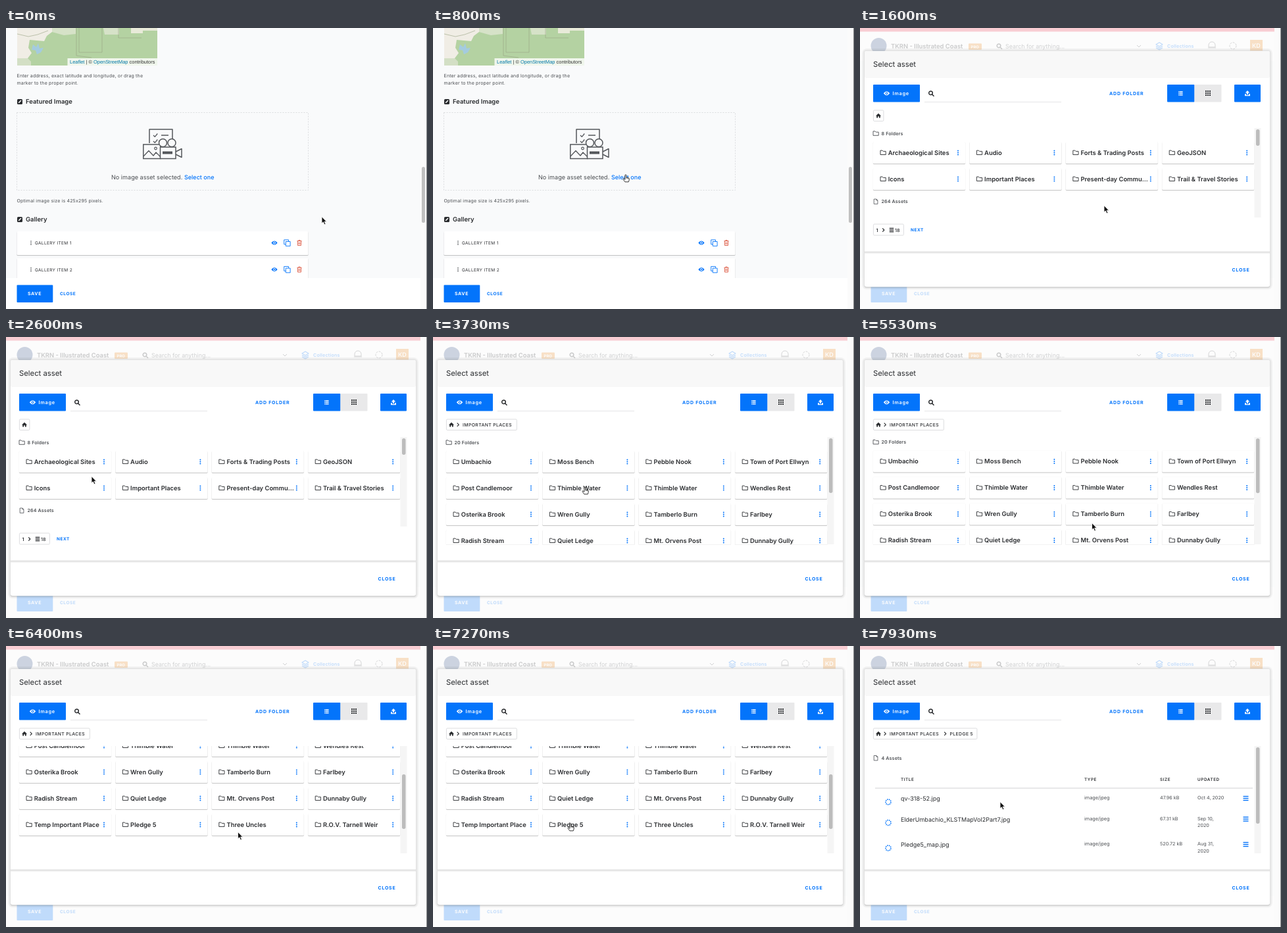
Recreate the animation shown at these times as an HTML page. Size 640x427 px, loop 8000 ms.

```html
<!DOCTYPE html>
<html lang="en">
<head>
<meta charset="utf-8">
<title>Select asset</title>
<style>
html, body { margin: 0; width: 100%; height: 100%; overflow: hidden; background: #f9fafb; }
svg { display: block; width: 100vw; height: 100vh; }
text { font-family: Inter, sans-serif; white-space: pre; text-rendering: geometricPrecision; }
</style>
</head>
<body>
<svg id="stage" viewBox="0 0 640 427" xmlns="http://www.w3.org/2000/svg"></svg>
<script>
const LOOP = 8000, BLUE = '#0374fb', INK = '#2b2d30', GREY = '#4c4f53';

const text = (x, y, s, size, fill = INK, weight = 400, gap = 0, more = '') =>
  `<text x="${x}" y="${y}" font-size="${size}" fill="${fill}" font-weight="${weight}" letter-spacing="${gap}" ${more}>${s}</text>`;
const rect = (x, y, w, h, fill, more = '') =>
  `<rect x="${x}" y="${y}" width="${w}" height="${h}" fill="${fill}" ${more}/>`;
const line = (d, stroke, width = 1, more = '') =>
  `<path d="${d}" fill="none" stroke="${stroke}" stroke-width="${width}" stroke-linejoin="round" ${more}/>`;
const shape = (d, fill, more = '') => `<path d="${d}" fill="${fill}" ${more}/>`;
const dot = (x, y, r, fill, more = '') => `<circle cx="${x}" cy="${y}" r="${r}" fill="${fill}" ${more}/>`;
const group = (body, more = '') => `<g ${more}>${body}</g>`;
const at = (x, y, body) => group(body, `transform="translate(${x} ${y})"`);

const card = (x, y, w, h) =>
  rect(x - .5, y, w + 1, h + 1.6, '#000', 'opacity=".05" rx="2"') +
  rect(x, y + 1, w, h, '#000', 'opacity=".17" rx="1.5"') + rect(x, y, w, h, '#fff', 'rx="1.5"');

// Icons, each centred on 0,0
const eye = color => shape('M-4.7 0Q0-6 4.7 0Q0 6-4.7 0Z', color) + dot(0, 0, 1.9, '#fff') + dot(0, 0, 1.1, color);
const dots = (color, r = 1, gap = 3) => [-gap, 0, gap].map(y => dot(0, y, r, color)).join('');
const bars = (color, w = 8, gap = 3) => [-gap, 0, gap].map(y => rect(-w / 2, y - .7, w, 1.4, color)).join('');
const folder = color => line('M-4-3.2H-1L.3-1.9H4.2V3.2H-4Z', color, .9);
const sheet = color => line('M-2.8-3.7H1L2.9-1.8V3.7H-2.8ZM1-3.7V-1.8H2.9', color, .8);
const home = shape('M-4 .2L0-3.5L4 .2H2.8V3.3H.9V.9H-.9V3.3H-2.8V.2Z', INK);
const chevron = color => line('M-1.3-2.6L1.3 0L-1.3 2.6', color, 1.2);
const lens = (color, r = 2.8) => line(`M${-r - 1} -1a${r} ${r} 0 1 0 ${2 * r} 0a${r} ${r} 0 1 0 ${-2 * r} 0M1.2 1.2L4 4`, color, 1.5);
const edit = rect(-4, -4, 8, 8, INK, 'rx="1.6"') + line('M-1.8 1.8L2-2', '#fff', 1.5);
const copy = line('M-2-2H4.8V4.8H-2ZM-2.2 2.2H-4.6V-4.6H2.2V-2.2', BLUE, .9);
const trash = line('M-3.5-2.8H3.5M-1.2-3V-4H1.2V-3M-2.7-2.8L-2.4 4H2.4L2.7-2.8M-.9-1V2.4M.9-1V2.4', '#dd5a43', .9);

function map() {
  return group(
    rect(17, 0, 213, 57, '#b4d2a2') +
    shape('M17 0H70V6L62 12L58 20L36 18L34 30L39 38L33 46H17Z', '#f0ede5') +
    shape('M17 46H33L38 51V57H17Z', '#d3dfc5') +
    shape('M70 0H106V9L88 11L70 6ZM148 0H172V10H150Z', '#d6e2c8') +
    shape('M190 0H230V4H208V8H190Z', '#e8ead9') +
    shape('M41 25L46 29L49 23L51 31L57 30L53 37L47 40L45 34L39 33Z', '#a4cbdf') +
    line('M17 9L34 13L48 10L64 4M107 0V42L130 45M111 0V37H146V0M171 0V15H206', '#98a284', .6) +
    rect(93.5, 46, 136.5, 11, '#fff', 'opacity=".8"') +
    `<text x="97" y="54.4" font-size="7.45" fill="#333" style="font-family:'Liberation Sans',Arial,sans-serif"><tspan fill="#0078a8">Leaflet</tspan> | © <tspan fill="#0078a8">OpenStreetMap</tspan> contributors</text>`);
}

const mediaIcon = group(
  line('M218 175V154H253V168M236 163H247M232 172H237', '#54575b', 1.5) +
  line('M224 163L226.3 165.3L230.3 160.5M224 172L226.3 174.3L230.3 169.5', '#54575b', 1.3) +
  rect(208.8, 177, 26, 21.5, '#f9fafb', 'stroke="#54575b" stroke-width="1.5"') +
  line('M209 195L217 186.5L224 194L228 189L235 196', '#54575b', 1.3) +
  dot(227.5, 183, 1.8, 'none', 'stroke="#54575b" stroke-width="1.2"') +
  [238.5, 252].map(x => dot(x, 174.5, 6, '#f9fafb', 'stroke="#54575b" stroke-width="1.5"')).join('') +
  rect(234.5, 181, 23.5, 17.5, '#f9fafb', 'stroke="#54575b" stroke-width="1.5"') +
  line('M258 188L267 183.5V196.5L258 192', '#54575b', 1.5) + rect(238, 187.5, 15, 4, '#54575b'));

function galleryItem(n, y) {
  return card(16.5, y - 18, 443, 36) + at(38, y - .5, dots(GREY, .8, 2.4)) +
    text(44, y + 2, 'GALLERY ITEM ' + n, 6.5, INK, 400, .34) +
    at(408, y - .5, eye(BLUE)) + at(427.3, y - .5, copy) + at(446, y - .5, trash);
}

function page() {
  return rect(0, 0, 640, 427, '#f9fafb') + map() +
    text(16.5, 75.3, 'Enter address, exact latitude and longitude, or drag the', 7, GREY, 400, .18) +
    text(16.5, 86.2, 'marker to the proper point.', 7, GREY, 400, .18) +
    at(21, 112, edit) + text(30, 115.4, 'Featured Image', 9.45, INK, 600) +
    rect(16.5, 128.5, 443, 118, 'none', 'stroke="#d6d8db" stroke-width=".9" stroke-dasharray="2 2"') +
    mediaIcon +
    text(160, 229.6, 'No image asset selected.', 9.1, GREY) +
    text(271, 229.6, 'Select one', 9, BLUE, 500) +
    text(16.5, 264.7, 'Optimal image size is 425x295 pixels.', 7, GREY, 400, .18) +
    at(21, 291, edit) + text(30, 294.4, 'Gallery', 9.45, INK, 600) +
    galleryItem(1, 327) + galleryItem(2, 367.5) +
    rect(630, 0, 10, 427, '#fbfbfb') + rect(632, 211, 5, 85, '#c1c1c1', 'rx="2.5"') +
    rect(0, 380, 630, 47, '#fff') +
    rect(16.5, 390.5, 54.8, 26.5, BLUE, 'rx="1"') + text(33, 406.4, 'SAVE', 7, '#fff', 700, .6) +
    text(82, 406.3, 'CLOSE', 6.5, BLUE, 700, .55);
}

function topBar() {
  return rect(0, 0, 630, 50, '#fff') + rect(0, 0, 630, 5.5, '#ee3a55') +
    dot(28.5, 27, 12, '#37558a') +
    text(47, 31, 'TKRN - Illustrated Coast', 9.4, INK, 600) +
    rect(165, 23.5, 20, 9.5, '#f08a1c', 'rx="1"') + text(168.5, 30.6, 'PRO', 6, '#fff', 700) +
    at(212, 28, lens(INK)) + text(221, 31, 'Search for anything...', 8.9, GREY) +
    line('M421 26L424 29L427 26', GREY, 1) +
    at(455, 27, line('M-5-2L0-5L5-2L0 1ZM-5 .5L0 3.5L5 .5M-5 3L0 6L5 3', BLUE, 1.2)) +
    text(467, 30, 'Collections', 7.1, BLUE, 600, .2) +
    line('M530 29V26a5 5 0 0 1 10 0V29ZM529 30H541', GREY, .9) +
    dot(567, 27, 5, 'none', `stroke="${GREY}" stroke-width=".9" stroke-dasharray="3 1.5"`) +
    rect(593, 18, 19, 16.5, '#f08a1c') + text(596, 30, 'KD', 9, '#fff', 600);
}

function folders(names) {
  return names.map((name, i) => {
    const x = 20 + i % 4 * 146.4, y = 173 + (i >> 2) * 40;
    return card(x, y, 140, 33) + at(x + 15, y + 16.3, folder(INK)) +
      text(x + 22.7, y + 19.8, name, 9.4, INK, 600) + at(x + 129, y + 16.5, dots(BLUE));
  }).join('');
}
const heading = (icon, y, s) => at(24, y - 2.6, icon(GREY)) + text(32.5, y, s, 7.1, GREY, 600, .15);

function scroller(end, size) {
  return rect(599.5, 152, 10, end - 152, '#f5f5f5') +
    rect(602, 154, 5.5, size, '#bcbcbc', 'class="thumb" rx="2.7"');
}

function crumbs(width, ...names) {
  let x = 38;
  return rect(20.4, 125, width, 16.5, '#fff', 'rx="1.5" stroke="#d9dadc" stroke-width=".9"') + at(28, 133.3, home) +
    names.map(name => {
      const part = at(x, 133.3, chevron(INK)) + text(x + 7, 135.8, name, 6.9, INK, 500, .36);
      x += 91.5;
      return part;
    }).join('');
}

const ROOT = ['Archaeological Sites', 'Audio', 'Forts &amp; Trading Posts', 'GeoJSON',
  'Icons', 'Important Places', 'Present-day Commu...', 'Trail &amp; Travel Stories'];
const PLACES = ['Umbachio', 'Moss Bench', 'Pebble Nook', 'Town of Port Ellwyn',
  'Post Candlemoor', 'Thimble Water', 'Thimble Water', 'Wendles Rest',
  'Osterika Brook', 'Wren Gully', 'Tamberlo Burn', 'Farlbey',
  'Radish Stream', 'Quiet Ledge', 'Mt. Orvens Post', 'Dunnaby Gully',
  'Temp Important Place', 'Pledge 5', 'Three Uncles', 'R.O.V. Tarnell Weir'];
const FILES = [
  [235, 'qv-318-52.jpg', '47.96 kB', 'Oct 4, 2020'],
  [266.5, 'ElderUmbachio_KLSTMapVol2Part7.jpg', '67.31 kB', 'Sep 10,', '2020'],
  [305, 'Pledge5_map.jpg', '520.72 kB', 'Aug 31,', '2020']];

function rootView() {
  return crumbs(15.5) +
    group(heading(folder, 162.7, '8 Folders') + folders(ROOT) + heading(sheet, 266.3, '264 Assets'), 'clip-path="url(#short)"') +
    scroller(288, 25) +
    rect(20.4, 298, 46, 17, '#fff', 'rx="1.5" stroke="#d9dadc" stroke-width=".9"') +
    text(24.5, 309.6, '1', 7.2, INK, 600) + at(35.5, 307, chevron(INK)) + at(48, 307, bars(INK, 6.5, 2.6)) +
    text(53, 309.6, '18', 7.2, INK, 500) + text(77, 309.3, 'NEXT', 6.4, BLUE, 700, .6);
}

function placesView() {
  return crumbs(107, 'IMPORTANT PLACES') +
    group(group(heading(folder, 162.7, '20 Folders') + folders(PLACES), 'id="list"'), 'clip-path="url(#tall)"') +
    scroller(315, 83);
}

function filesView() {
  const heads = [[62, 'TITLE'], [341, 'TYPE'], [456, 'SIZE'], [513, 'UPDATED']];
  const spinner = Array.from({ length: 9 }, (_, i) => {
    const a = i * Math.PI * 2 / 9;
    return dot(4 * Math.cos(a), 4 * Math.sin(a), .9, BLUE);
  }).join('');
  return crumbs(157.5, 'IMPORTANT PLACES', 'PLEDGE 5') + heading(sheet, 172.8, '4 Assets') +
    heads.map(([x, s]) => text(x, 204.8, s, 6.3, INK, 600, .6)).join('') +
    line('M23 216H597', '#cfd0d2', 1) +
    FILES.map(([y, name, size, ...date]) =>
      at(43, y + 2, group(spinner, 'class="spin"')) + text(62, y, name, 9, INK) +
      text(341, y - 2, 'image/jpeg', 7.3, GREY) + text(456, y - 2, size, 7.2, GREY) +
      date.map((s, i) => text(513, y - 2 + i * 10.5, s, 7.2, GREY)).join('') +
      at(586.5, y - 3.5, bars(BLUE))).join('') +
    scroller(315, 116);
}

function modal() {
  const halo = [4, 2.5, 1].map(g => rect(7 - g, 35 - g, 616 + 2 * g, 358.5 + 2 * g, '#000', `rx="${3 + g}" opacity=".035"`)).join('');
  return halo + rect(7, 36, 616, 358.5, '#000', 'rx="3" opacity=".15"') + rect(7, 35, 616, 358.5, '#fff', 'rx="3"') +
    rect(7, 35, 616, 41, '#f8f8f8', 'rx="3"') + text(20, 58.8, 'Select asset', 11.3, INK) +
    rect(7, 339, 616, 4, '#f3f3f3') + rect(7, 340, 616, 1.4, '#dfdfdf') +
    text(565.5, 369.5, 'CLOSE', 7, BLUE, 700, .75) +
    rect(20, 86, 71, 26.5, BLUE, 'rx="1"') + at(40.5, 99.3, eye('#fff') + dot(0, 0, 2, BLUE) + dot(0, 0, 1, '#fff')) +
    text(49.5, 102, 'Image', 7.4, '#fff', 600, .7) +
    at(108.5, 99.8, lens(INK)) + line('M98 112.5H306', '#e2e3e5', .9) +
    text(379, 102, 'ADD FOLDER', 7, BLUE, 700, .8) +
    rect(467, 86, 41.5, 26.5, BLUE, 'rx="1"') +
    at(488, 99.3, bars('#fff', 5.2, 2.4) + [-2.4, 0, 2.4].map(y => rect(-4, y - .7, .9, 1.4, '#fff')).join('')) +
    rect(508.5, 86, 41, 26.5, '#e9e9ea', 'rx="1"') +
    [-3, 0, 3].map(x => [-3, 0, 3].map(y => rect(528 + x, 98 + y, 2, 2, INK)).join('')).join('') +
    rect(569, 86, 40, 26.5, BLUE, 'rx="1"') +
    shape('M589 95L592.3 98.4H590V101H588V98.4H585.7ZM585 100.3H587V102H591V100.3H593V103.3H585Z', '#fff') +
    group(rootView(), 'id="root"') + group(placesView(), 'id="places"') + group(filesView(), 'id="files"');
}

const arrow = shape('M0-1.3V8.9L2.3 6.8L4 10.7L5.9 9.9L4.2 6.2H7.4Z', '#111', 'stroke="#fff" stroke-width=".8"');
const hand = group(
  shape('M-1.2 1a1.1 1.1 0 0 1 2.2 0V4.4L2.6 4.6L4.4 5.1L5.6 6V9L4.6 11.8H-1.2L-3.9 8.2Q-5 6.4-3.5 6.2L-1.2 8Z',
    '#fff', 'stroke="#222" stroke-width="1"') + line('M1 4.4V6.4M2.8 4.8V6.6M4.4 5.3V6.8', '#222', .7),
  'transform="scale(.92)"');

const $ = id => document.getElementById(id);
const stage = $('stage');
stage.innerHTML =
  '<defs><clipPath id="short"><rect x="8" y="152" width="592" height="136"/></clipPath>' +
  '<clipPath id="tall"><rect x="8" y="152" width="592" height="163.5"/></clipPath></defs>' +
  page() + group(topBar() + rect(630, 0, 10, 427, '#fbfbfb'), 'id="bar"') +
  rect(0, 0, 640, 427, '#fcfcfc', 'id="veil"') + line('M639.5 0V427', '#8b8c8e', 1) +
  group(modal(), 'id="modal"') +
  group(group(arrow, 'id="arrow"') + group(hand, 'id="hand"'), 'id="cursor"');

const thumb = $('places').querySelector('.thumb');
const spins = [...stage.querySelectorAll('.spin')];

// Cursor stops: time, x, y
const PATH = [[70, 480, 288], [680, 293, 223], [1080, 293, 223], [1550, 371, 271], [1850, 371, 271],
  [2500, 130, 213], [2700, 130, 213], [3200, 231, 228], [3850, 231, 228], [4450, 249.5, 261], [5000, 249.5, 261],
  [5500, 352.5, 284], [6450, 352.5, 284], [6900, 209, 270], [7400, 209, 270], [7850, 213, 238], [8000, 213, 238]];
const HANDS = [[600, 1120], [3080, 3920], [6780, 7450]];
const OPEN = 1080, ENTER_PLACES = 3700, ENTER_FILES = 7450;

const ease = (t, a, b) => {
  const k = Math.min(1, Math.max(0, (t - a) / (b - a)));
  return k * k * (3 - 2 * k);
};
const show = (id, on) => $(id).setAttribute('display', on ? 'inline' : 'none');
const move = (el, x, y) => el.setAttribute('transform', `translate(${x} ${y})`);

function cursorAt(t) {
  let [, x, y] = PATH[0];
  for (let i = 1; i < PATH.length; i++) {
    const k = ease(t, PATH[i - 1][0], PATH[i][0]);
    x += (PATH[i][1] - PATH[i - 1][1]) * k;
    y += (PATH[i][2] - PATH[i - 1][2]) * k;
  }
  return [x, y];
}

function render(t) {
  const fade = ease(t, OPEN, OPEN + 280), scroll = 78 * ease(t, 5500, 6150);
  $('bar').setAttribute('opacity', fade);
  $('veil').setAttribute('opacity', .76 * fade);
  $('modal').setAttribute('opacity', fade);
  move($('modal'), 0, -18 * (1 - fade));
  show('modal', t >= OPEN);
  show('root', t < ENTER_PLACES);
  show('places', t >= ENTER_PLACES && t < ENTER_FILES);
  show('files', t >= ENTER_FILES);
  move($('list'), 0, -scroll);
  thumb.setAttribute('y', 154 + scroll * .526);
  spins.forEach(el => el.setAttribute('transform', `rotate(${t * .36})`));
  move($('cursor'), ...cursorAt(t));
  const pointing = HANDS.some(([a, b]) => t >= a && t < b);
  show('hand', pointing);
  show('arrow', !pointing);
}

function tick() {
  render(performance.now() % LOOP);
  requestAnimationFrame(tick);
}
tick();
</script>
</body>
</html>
```
